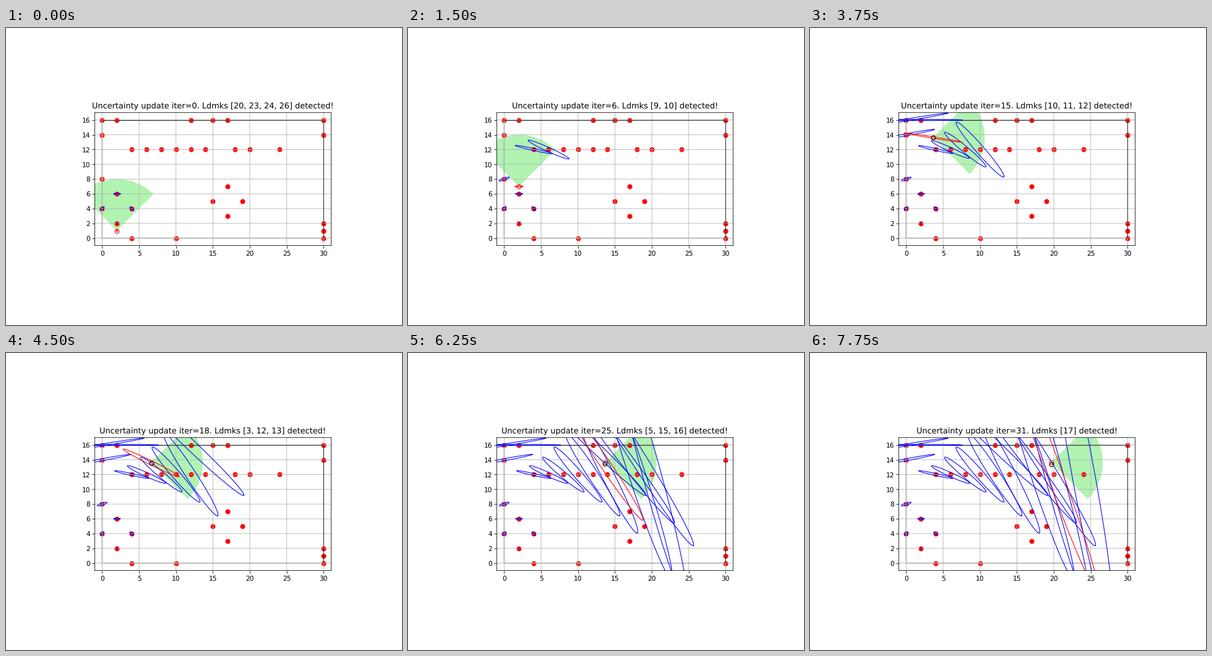
Recreate the animation shown at these times as a matplotlib script. Size 640 by 480 pixels, loop 8 s.

```python
import numpy as np
import matplotlib.pyplot as plt
from matplotlib.animation import FuncAnimation
from matplotlib.patches import Wedge

S = 0.77  # the plot is a reduced copy of a default-sized one
STEPS = 32
RANGE = 7
FOV = 45
START_X = 2
TOP_Y = 13
TURN_RADIUS = 2 / np.pi

plt.rcParams.update({
    "font.family": "DejaVu Sans",
    "font.size": 10 * S,
    "axes.linewidth": 0.75 * S,
    "grid.linewidth": 0.75 * S,
    "path.snap": False,
    "text.hinting": "none",
})
for axis in ("xtick", "ytick"):
    plt.rcParams.update({
        f"{axis}.major.size": 3.5 * S,
        f"{axis}.major.width": 0.75 * S,
        f"{axis}.major.pad": 3.5 * S,
    })

# Landmarks by row; ids count from 1, top row first, left to right
ROWS = {
    16: (0, 2, 12, 15, 17, 30), 14: (0, 30),
    12: (*range(4, 15, 2), 18, 20, 24),
    8: (0,), 7: (17,), 6: (2,), 5: (15, 19), 4: (0, 4),
    3: (17,), 2: (2, 30), 1: (30,), 0: (4, 10, 30),
}
LANDMARKS = np.array([(x, y) for y, xs in ROWS.items() for x in xs], float)


def pose(i):
    """Drive up, turn right on a two-step arc, then drive along x."""
    up = TOP_Y - 1
    turn = np.pi / 4 * np.clip(i - up, 0, 2)
    x = START_X + TURN_RADIUS * (1 - np.cos(turn)) + max(i - up - 2, 0)
    y = min(1 + i, TOP_Y) + TURN_RADIUS * np.sin(turn)
    return x, y, 90 - np.degrees(turn)


def detected(i):
    x, y, heading = pose(i)
    dx, dy = (LANDMARKS - (x, y)).T
    bearing = np.degrees(np.arctan2(dy, dx)) - heading
    bearing = (bearing + 180) % 360 - 180
    seen = (np.abs(bearing) < FOV + 1e-6) & (np.hypot(dx, dy) <= RANGE)
    return [int(k) + 1 for k in np.flatnonzero(seen)]


def ellipse(x, y, pivot_y, spread, width, scale=1):
    """Heading error smears a point sideways around a pivot on the first leg.

    spread(d) gives the half length per unit of distance d from the pivot.
    """
    vx, vy = x - START_X, y - pivot_y
    d = np.hypot(vx, vy)
    major = scale * spread(d)
    minor = max(width * abs(vx), 0.08) / d
    t = np.linspace(0, 2 * np.pi, 160)
    c, s = major * np.cos(t), minor * np.sin(t)
    return x + vy * c + vx * s, y - vx * c + vy * s


def landmark_ellipse(k, i):
    first = FIRST[k]
    return ellipse(
        *LANDMARKS[k - 1], 1.9 + 0.21 * first,
        lambda d: np.clip(0.048 * d + 0.0144 * first - 0.26, 0.11, 0.97),
        0.07, 1.07 if i < 14 else 1)


def robot_ellipse(x, y, i):
    return ellipse(x, y, 0.14 + 0.22 * i,
                   lambda d: max(0.074 * d - 0.38, 0.1), 0.06)


SEEN = [detected(i) for i in range(STEPS)]
FIRST = {k: i for i in reversed(range(STEPS)) for k in SEEN[i]}

fig = plt.figure(figsize=(6.4, 4.8), dpi=100, facecolor="white")
ax = fig.add_axes([143.45 / 640, 128.45 / 480, 381.92 / 640, 214.83 / 480])
ax.set(xlim=(-1, 31), ylim=(-1, 17),
       xticks=range(0, 31, 5), yticks=range(0, 17, 2))
ax.grid(True)
title = ax.set_title("", fontsize=12 * S, pad=6 * S)

ax.scatter(*LANDMARKS.T, s=36 * S**2, c="red", linewidths=1.5 * S, zorder=1)
ax.plot([0, 0, 30], [16, 0, 0], color="#b0b0b0", lw=1.2, zorder=1.4)
ax.plot([0, 30, 30], [15.93, 15.96, 0], color="#333333", lw=0.8, zorder=1.6)

view = Wedge((0, 0), RANGE, 0, 90, fc="lightgreen", lw=0, alpha=0.7, zorder=0.5)
ax.add_patch(view)


def outline(color, z):
    return ax.plot([], [], color, lw=S, zorder=z)[0]


def ring(color, z):
    return ax.plot([], [], "o", mfc="none", mec=color,
                   ms=6.2 * S, mew=S, zorder=z)[0]


outlines = {k: outline("b", 2) for k in FIRST}
robot_outline = outline("r", 2.1)
true_ring = ring("red", 2.2)
guess_ring = ring("black", 2.3)


def update(i):
    x, y, heading = pose(i)
    title.set_text(f"Uncertainty update iter={i}. Ldmks {SEEN[i]} detected!")

    view.set_center((x, y))
    view.set_theta1(heading - FOV)
    view.set_theta2(heading + FOV)

    for k, line in outlines.items():
        line.set_data(*landmark_ellipse(k, i))
        line.set_visible(i >= FIRST[k])

    guess_y = y - 0.015 * max(i - 14, 0)
    robot_outline.set_data(*robot_ellipse(x, guess_y, i))
    true_ring.set_data([x], [y])
    guess_ring.set_data([x], [guess_y])
    guess_ring.set_visible(heading < 90)
    return []


anim = FuncAnimation(fig, update, frames=STEPS, interval=250,
                     init_func=lambda: update(0), repeat=True, repeat_delay=0)
plt.show()
```
